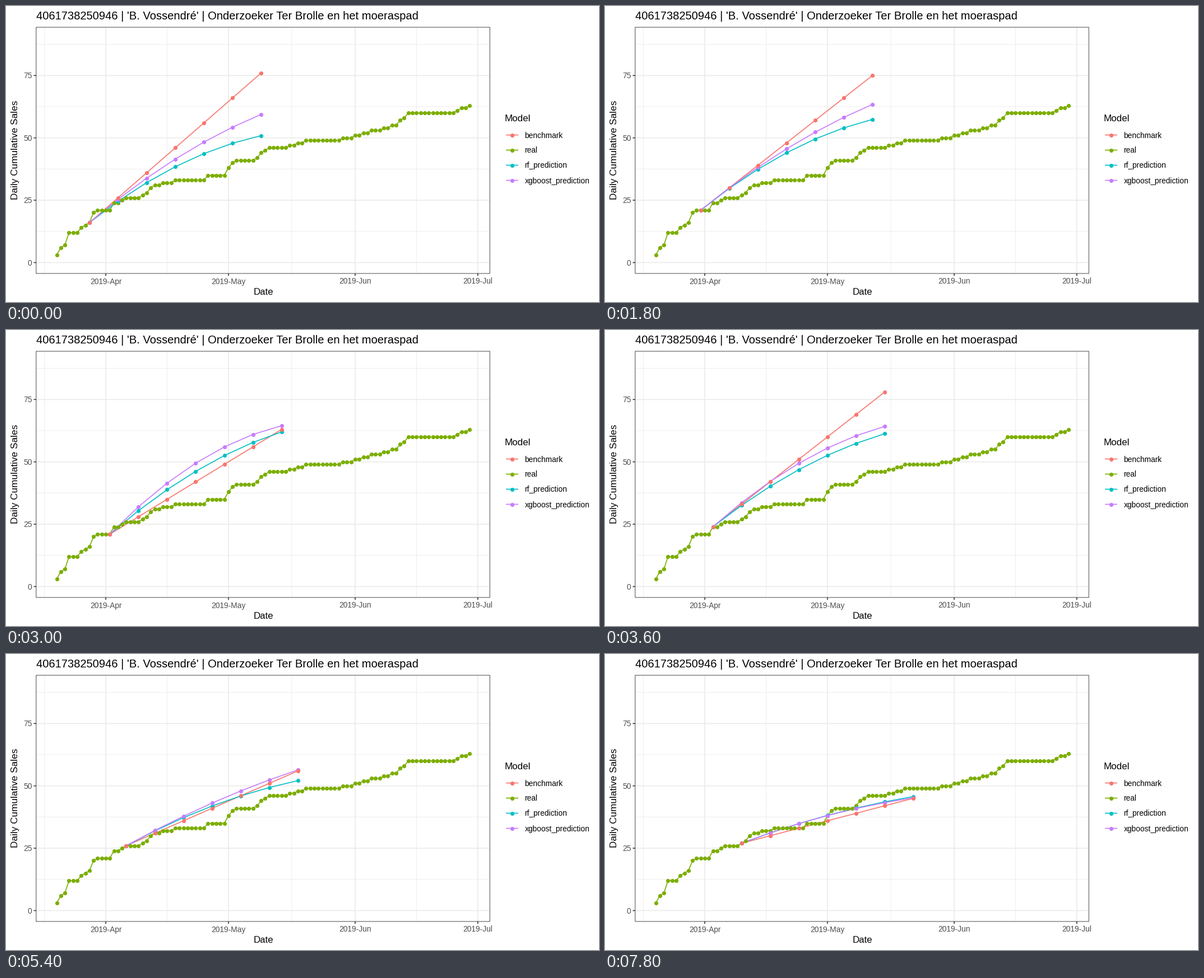
A matplotlib script that plays this animation: 1058 px wide and 529 px high, repeating every 8 s.

```python
import numpy as np
import matplotlib.pyplot as plt
from matplotlib.animation import FuncAnimation

W, H, DPI = 1058, 529, 64
PX = 72 / DPI  # points per pixel
FRAMES, INTERVAL, HOLD = 40, 200, 3

plt.rcParams["font.family"] = "Liberation Sans"

COLORS = {"benchmark": "#F8766D", "real": "#7CAE00",
          "rf_prediction": "#00BFC4", "xgboost_prediction": "#C77CFF"}
TITLE = "4061738250946 | 'B. Vossendré' | Onderzoeker Ter Brolle en het moeraspad"
LEFT, RIGHT, TOP, BOTTOM = 53.3, 862.7, 37.5, 477.5
Y_LIMIT = 90
FIRST_DAY, WEEKS = 8, np.arange(7)

# Bends of the cumulative sales curve as (day, copies); whole copies between
BENDS = [(0, 3), (1, 6), (2, 7), (3, 12), (5, 12), (6, 14), (8, 16), (9, 20),
         (10, 21), (13, 21), (14, 24), (15, 24), (17, 26), (20, 26), (24, 31),
         (30, 33), (36, 33), (37, 35), (41, 35), (42, 38), (44, 41), (48, 41),
         (52, 46), (56, 46), (61, 49), (69, 49), (73, 51), (83, 55), (86, 60),
         (97, 60), (101, 63)]
real = np.round(np.interp(np.arange(102), *zip(*BENDS)))

# Six-week gain and curvature of each forecast, eased between a few start days
KEYS = [0, 3, 5, 9, 11, 13]
RF = ([34.9, 36.4, 41, 26.1, 21.5, 18.7], [0.57, 0.53, 0.46, 0.44, 0.41, 0.39])
XGB = ([43.4, 42.4, 43.5, 30.4, 26.5, 18.2], [0.35, 0.32, 0.62, 0.25, 0.27, 0.44])


def day_x(day):
    return 90 + 7.294 * np.asarray(day)


def val_y(value):
    return 458 - 4.457 * np.asarray(value)


def forecast(shape, step):
    gain, bend = (np.interp(step, KEYS, v) for v in shape)
    u = WEEKS / 6
    return real[FIRST_DAY + step] + gain * u * (1 + bend * (1 - u))


def benchmark(step):
    """Repeat last week's sales every week."""
    day = FIRST_DAY + step
    values = real[day] + WEEKS * (real[day] - real[day - 7])
    return np.where(values <= Y_LIMIT, values, np.nan)


fig = plt.figure(figsize=(W / DPI, H / DPI), dpi=DPI, facecolor="white")
ax = fig.add_axes([0, 0, 1, 1])
ax.set_xlim(-0.5, W - 0.5)  # whole numbers are pixel centres
ax.set_ylim(H - 0.5, -0.5)
ax.axis("off")


def line(xs, ys, color, width, z):
    return ax.plot(xs, ys, color=color, lw=width * PX, zorder=z, snap=False,
                   solid_capstyle="butt", solid_joinstyle="round")[0]


def dots(xs, ys, color, z):
    return ax.plot(xs, ys, "o", color=color, ms=7.2 * PX, mew=0, zorder=z,
                   snap=False)[0]


def label(x, y, text, size, color="black", ha="left", **kw):
    ax.text(x, y, text, size=size * PX, color=color, ha=ha, va="baseline", **kw)


def grid(xs, ys, width):
    for x in xs:
        line([x, x], [TOP, BOTTOM], "#EBEBEB", width, 1)
    for y in ys:
        line([LEFT, RIGHT], [y, y], "#EBEBEB", width, 1)


months = {"2019-Apr": 12, "2019-May": 42, "2019-Jun": 73, "2019-Jul": 103}
grid(day_x([-3, 27, 57.5, 88]), val_y([12.5, 37.5, 62.5, 87.5]), 0.85)
grid(day_x(list(months.values())), val_y([0, 25, 50, 75]), 1.67)

for name, day in months.items():
    x = day_x(day)
    line([x, x], [BOTTOM, BOTTOM + 4.3], "#333333", 1.6, 8)
    label(x, 496, name, 13.8, "#4D4D4D", "center")
for v in (0, 25, 50, 75):
    y = val_y(v)
    line([LEFT - 4.3, LEFT], [y, y], "#333333", 1.6, 8)
    label(46, y + 5, str(v), 13.8, "#4D4D4D", "right")

line([LEFT, RIGHT, RIGHT, LEFT, LEFT], [TOP, TOP, BOTTOM, BOTTOM, TOP],
     "#333333", 0.9, 8)
label(53, 23.5, TITLE, 20.15)
label(458.5, 516, "Date", 16.8, ha="center")
label(20.7, 257, "Daily Cumulative Sales", 17.1, ha="center",
      rotation=90, rotation_mode="anchor")

label(889, 206, "Model", 17)
for i, (name, color) in enumerate(COLORS.items()):
    y = 230 + 27 * i
    line([891.5, 913.5], [y, y], color, 1.67, 3)
    dots([902.5], [y], color, 4)
    label(925, y + 5, name, 13.8)

days = day_x(np.arange(len(real)))
line(days, val_y(real), COLORS["real"], 1.67, 3.1)
dots(days, val_y(real), COLORS["real"], 4)

MODELS = {"rf_prediction": (lambda s: forecast(RF, s), 3.2, 4.1),
          "xgboost_prediction": (lambda s: forecast(XGB, s), 3.3, 4.2),
          "benchmark": (benchmark, 3.0, 4.3)}
artists = [(f, line([], [], COLORS[m], 1.67, zl), dots([], [], COLORS[m], zp))
           for m, (f, zl, zp) in MODELS.items()]


def update(i):
    step = i // HOLD
    xs = day_x(FIRST_DAY + step + 7 * WEEKS)
    for values, path, marks in artists:
        ys = val_y(values(step))
        path.set_data(xs, ys)
        marks.set_data(xs, ys)
    return [a for row in artists for a in row[1:]]


anim = FuncAnimation(fig, update, frames=FRAMES, interval=INTERVAL,
                     repeat=True, repeat_delay=0)
plt.show()
```
